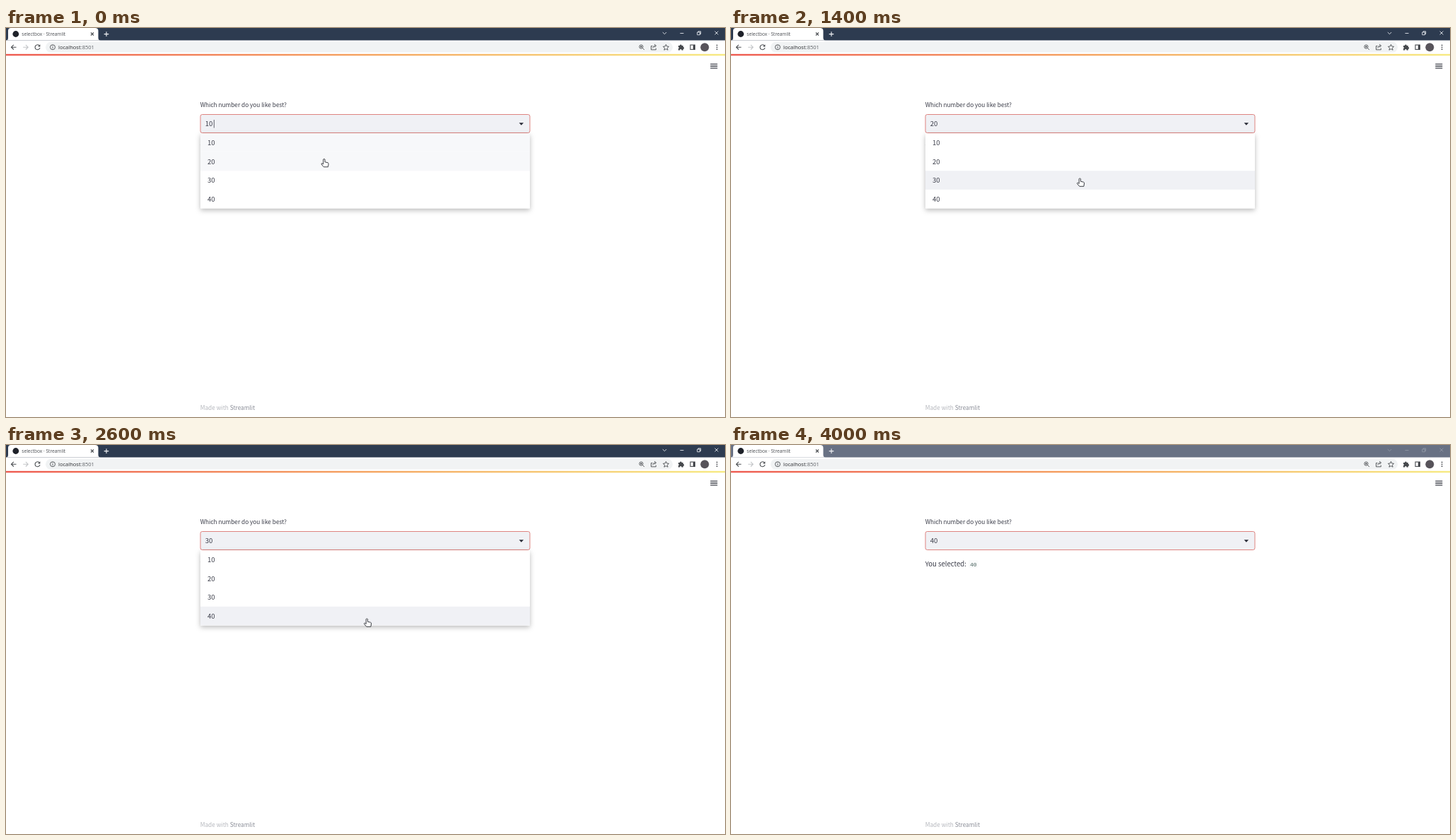
Write an HTML page that moves like this. It is 1017x551 px and loops after 4.16 s.

```html
<!DOCTYPE html>
<html lang="en">
<head>
<meta charset="utf-8">
<title>selectbox</title>
<style>
  html, body { margin: 0; width: 100%; height: 100%; overflow: hidden; background: #fff; }
  svg { display: block; width: 100%; height: 100%; }
  text { white-space: pre; }
  .page { font-family: "Noto Sans CJK JP", "Noto Sans CJK SC", "Noto Sans CJK", "Noto Sans CJK KR", "Open Sans", sans-serif; fill: #3b3d49; }
  .big { font-size: 9.55px; }
  .small { font-size: 8.3px; }
  .ui { font-family: "Open Sans", "Noto Sans", sans-serif; }
  .code { font-family: "Liberation Mono", "DejaVu Sans Mono", monospace; font-size: 8px; fill: #46605c; }
  .line { fill: none; stroke: #4a4d51; stroke-width: 1.1; }
</style>
</head>
<body>
<svg viewBox="0 0 1017 551" preserveAspectRatio="none">
  <defs>
    <linearGradient id="rainbow">
      <stop offset="0" stop-color="#ee5a50"/>
      <stop offset=".5" stop-color="#f5a35f"/>
      <stop offset="1" stop-color="#f7ea82"/>
    </linearGradient>
    <filter id="shadow" x="-5%" y="-15%" width="110%" height="135%">
      <feDropShadow dx="0" dy="2.7" stdDeviation="3.6" flood-color="#000" flood-opacity=".27"/>
    </filter>
  </defs>

  <rect width="1017" height="551" fill="#fff"/>

  <!-- title bar -->
  <rect id="bar" width="1017" height="17.5"/>
  <path d="M0 17.5Q3 17.5 3 14V4Q3 0 7 0H126Q130.500 0 130.500 4V14Q130.500 17.500 134 17.500Z" fill="#fff"/>
  <circle cx="13.800" cy="8.500" r="4.400" fill="#1e2129"/>
  <text class="ui" x="22.300" y="11.200" font-size="6.600" fill="#4a4d52">selectbox · Streamlit</text>
  <path class="line" d="M120 6.500l4 4m0-4l-4 4"/>
  <path class="line" style="stroke:#f4f5f7" d="M142 5.300v6.600M138.700 8.600h6.600"/>
  <g id="winBtns" fill="none" stroke="#e4e7ec" stroke-width=".9">
    <path d="M928.800 6l2.700 2.700L934.200 6"/>
    <path d="M953.500 7.500h5"/>
    <path d="M977.800 6h3.700v3.700h-3.700zM979 6V4.800h3.700v3.700h-1.200"/>
    <path d="M1002.600 4.600l4.800 4.800m0-4.800l-4.800 4.800"/>
  </g>

  <!-- toolbar -->
  <rect x="56" y="19.800" width="887" height="14.800" rx="7.400" fill="#f1f3f4"/>
  <path class="line" d="M14.500 27.200H7.500m3.300-3.300L7.500 27.200l3.300 3.300"/>
  <path class="line" style="stroke:#c3c5c8" d="M24.200 27.200h7m-3.300-3.300l3.300 3.300-3.300 3.300"/>
  <path class="line" d="M47.300 25A3.500 3.500 0 1 0 48 28"/>
  <path d="M48.400 23.200v3.300h-3.300z" fill="#4a4d51"/>
  <circle class="line" cx="66" cy="27.200" r="3.500" style="stroke-width:.9"/>
  <path class="line" d="M66 26.700v2.300M66 25v.9" style="stroke-width:.9"/>
  <text class="ui" x="74" y="30" font-size="7.550" fill="#2a2c30">localhost<tspan fill="#5f6368">:8501</tspan></text>
  <g class="line" style="stroke-width:.9">
    <circle cx="898.400" cy="26.500" r="2.600"/>
    <path d="M900.400 28.400l2.500 2.500M897 26.500h2.800M898.400 25.100v2.800"/>
    <path d="M914.500 25.500h-2v5.300h6.800v-2.200M914.700 28.600q.3-3.500 4-3.500m-1.700-2l2.700 2-2.700 2.200"/>
    <path d="M933.500 23.300l1.200 2.700 2.900.3-2.200 2 .7 2.900-2.600-1.500-2.600 1.500.7-2.900-2.200-2 2.900-.3z"/>
  </g>
  <path d="M951 25h2a1.400 1.400 0 0 1 2.800 0h2v2a1.400 1.400 0 0 1 0 2.800v1.600h-2.200a1.300 1.300 0 0 0-2.600 0H951v-2.200a1.300 1.300 0 0 0 0-2.400z" fill="#46494d"/>
  <rect class="line" x="968" y="24" width="6.400" height="6.400"/>
  <rect x="971.800" y="24" width="2.800" height="6.400" fill="#46494d"/>
  <circle cx="988.300" cy="27.200" r="6" fill="#57535a"/>
  <g fill="#46494d">
    <circle cx="1005.600" cy="24.400" r=".85"/><circle cx="1005.600" cy="27.300" r=".85"/><circle cx="1005.600" cy="30.200" r=".85"/>
  </g>
  <rect y="36.800" width="1017" height="2.400" fill="url(#rainbow)"/>
  <path d="M996.300 51.100h10M996.300 54h10M996.300 56.900h10" stroke="#3f414b" stroke-width="1.300"/>

  <!-- page -->
  <text class="page small" x="274.700" y="112">Which number do you like best?</text>
  <rect id="box" x="275" y="122.500" width="466" height="26" rx="2.600" fill="#f0f1f5" stroke-width=".9"/>
  <text class="page big" id="value" x="281.700" y="139"></text>
  <path id="caret" d="M294.300 130v11.500" stroke="#3b3d49" stroke-width=".8"/>
  <path d="M725.700 134.300h6.400l-3.200 3.400z" fill="#262833"/>
  <text class="page big" x="274.700" y="171.500">You selected:</text>
  <rect x="335.700" y="163" width="14" height="11" rx="2" fill="#fafbfb"/>
  <text class="code" id="picked" x="337.900" y="171.600"></text>
  <text class="page small" x="274.700" y="541.200" style="fill:#b5b7bd">Made with <tspan font-weight="500" fill="#8a8d97">Streamlit</tspan></text>

  <g id="menu">
    <rect x="275" y="149.200" width="466" height="106.200" rx="1" fill="#fff" filter="url(#shadow)"/>
  </g>

  <g id="cursor">
    <path id="hand" d="M-1.200 .6Q0-.8 1.100 .6V4.300L5 5.200Q6.300 5.600 6.200 7L5.500 11.300H-.6L-3.800 7.600Q-4.300 6.500-3.200 6.200L-1.200 7.400Z" fill="#fff" stroke="#33353b" stroke-width=".95" stroke-linejoin="round"/>
    <path id="beam" d="M-2-4.500H-.5L0-4 .5-4.500H2M0-4V4M-2 4.500H-.5L0 4 .5 4.500H2" fill="none" stroke="#44464c" stroke-width=".95"/>
    <path id="arrow" d="M0 0V10.500L2.500 8.200 4.200 12 5.900 11.200 4.200 7.600H7.400Z" fill="#fff" stroke="#33353b" stroke-width=".8"/>
  </g>
</svg>

<script>
const LOOP = 4160, FADE = 100, ROW = 26.55, TOP = 149.2;
const $ = id => document.getElementById(id);
const clamp = v => Math.max(0, Math.min(1, v));
const ramp = (t, a, b) => clamp((t - a) / (b - a));
const mix = (a, b, k) => a + (b - a) * k;
const smooth = k => k * k * (3 - 2 * k);
const show = (id, on) => $(id).setAttribute('visibility', on ? 'visible' : 'hidden');

// Each time the list is open: start, end, preselected row
const opens = [[-140, 260, 0], [720, 1460, 1], [1845, 2680, 2]];

// Pointer moves: start, end, target x, target y
const start = [450, 185.5];
const moves = [
  [280, 560, 663, 134],
  [640, 1040, 493.5, 213],
  [1480, 1720, 675, 138],
  [1760, 2240, 510.5, 246],
  [2720, 2860, 520, 305],
  [2900, 3380, 1034, 562]
];

const rows = [];
for (let i = 0; i < 4; i++) {
  const add = (tag, attrs) => {
    const el = document.createElementNS('http://www.w3.org/2000/svg', tag);
    for (const k in attrs) el.setAttribute(k, attrs[k]);
    return $('menu').appendChild(el);
  };
  rows.push(add('rect', { x: 275, y: TOP + i * ROW, width: 466, height: ROW, fill: '#f0f1f5' }));
  add('text', { class: 'page big', x: 285, y: 166.2 + i * ROW }).textContent = 10 * (i + 1);
}

function pointer(t) {
  let [x, y] = start;
  for (const [a, b, tx, ty] of moves) {
    const k = smooth(ramp(t, a, b));
    x = mix(x, tx, k);
    y = mix(y, ty, k);
  }
  return [x, y];
}

function hovered(t) {
  let list = opens[0];
  for (const o of opens) if (t >= o[0]) list = o;
  const [a, b, preset] = list;
  if (t < a + FADE) return preset;
  const y = pointer(Math.min(t, b))[1];
  return Math.max(0, Math.min(3, Math.floor((y - TOP) / ROW)));
}

// Row highlights ease over the last 100 ms
function weight(row, t) {
  let n = 0;
  for (let k = 0; k < 6; k++) n += hovered(t - 20 * k) === row;
  return n / 6;
}

const choice = t => 10 + 10 * opens.filter(o => t >= o[1]).length;

function draw(t) {
  let opacity = 0, open = false;
  for (const [a, b] of opens) {
    opacity = Math.max(opacity, Math.min(ramp(t, a, a + FADE), 1 - ramp(t, b, b + FADE)));
    open = open || (t >= a && t < b);
  }
  $('menu').setAttribute('opacity', opacity);
  rows.forEach((r, i) => r.setAttribute('opacity', weight(i, t)));

  $('value').textContent = choice(t);
  $('picked').textContent = choice(t - 60);
  show('caret', t < 160 || (t >= 720 && t < 980) || (t >= 1860 && t < 2120));
  $('box').setAttribute('stroke', t >= 1760 && t < 1860 ? '#eda08c' : '#dc7773');

  const [x, y] = pointer(t);
  const inBox = y > 122 && y < 149;
  const inMenu = open && y >= 149 && y < 255.5;
  $('cursor').setAttribute('transform', `translate(${x} ${y})`);
  show('hand', inMenu);
  show('beam', inBox);
  show('arrow', !inMenu && !inBox);

  // Window loses focus near the end
  const blur = ramp(t, 3460, 3580);
  const rgb = [[45, 59, 80], [104, 113, 132]];
  $('bar').setAttribute('fill', `rgb(${rgb[0].map((c, i) => Math.round(mix(c, rgb[1][i], blur)))})`);
  $('winBtns').setAttribute('opacity', mix(1, .3, blur));
}

function tick() {
  draw(performance.now() % LOOP);
  requestAnimationFrame(tick);
}
tick();
</script>
</body>
</html>
```
